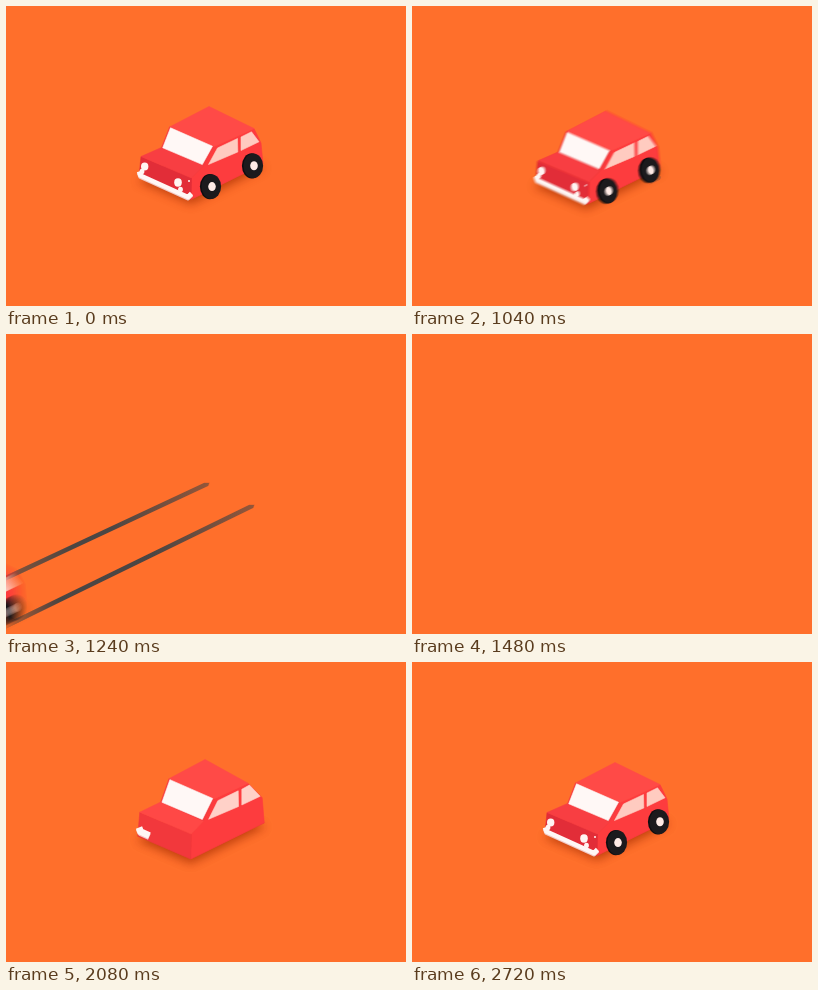
Animation, 400 px wide and 300 px high, one loop 2.76 s. Source, as an HTML page with a canvas:

```html
<!DOCTYPE html>
<html lang="en">
<head>
<meta charset="utf-8">
<title>Toy car</title>
<style>
  html, body { margin: 0; width: 100%; height: 100%; overflow: hidden; background: #ff6f2b; }
  canvas { display: block; width: 400px; height: 300px; }
</style>
</head>
<body>
<canvas id="stage" width="400" height="300"></canvas>
<script>
const LOOP = 2760, STEP = 40, SHUTTER = 9, SLOPE = 0.48;
const BUILD = 1770, DRIVE = 992, ERASE = 1226, EMPTY = 1480;

const stage = document.getElementById('stage').getContext('2d');
const layer = document.createElement('canvas');
layer.width = 400;
layer.height = 300;
const c = layer.getContext('2d');

const clamp = k => Math.min(1, Math.max(0, k));
const ramp = (t, from, to) => clamp((t - from) / (to - from));
const smooth = k => k * k * (3 - 2 * k);
const easeOut = k => 1 - (1 - k) ** 3;
const backOut = k => k <= 0 ? 0 : 1 + 2.7 * (k - 1) ** 3 + 1.7 * (k - 1) ** 2;
const mix = (a, b, k) => `rgb(${a.map((v, i) => v + (b[i] - v) * k)})`;
const travel = ms => 0.00397 * Math.max(0, ms) ** 2;

// Body points: screen x, screen y, height above ground, lean while stretched
const P = {
  baseL: [133, 171, 0], baseF: [185, 193.5, 0], baseR: [257, 158, 0], baseB: [205, 138, 0],
  noseL: [135, 150.5, 20], noseR: [185.5, 172, 20],
  cowlL: [155.5, 141.5, 26], cowlR: [197.5, 160, 26], tail: [255, 137, 24],
  roofL: [163.5, 121, 42], roofF: [208, 140.5, 42], roofR: [248, 122.5, 42, 7], roofB: [203, 100.5, 42, 4]
};
const face = names => names.split(' ').map(n => P[n]);
const BASE = face('baseL baseF baseR baseB');
const FRONT = face('baseL baseF noseR noseL');
const SIDE = face('baseF noseR cowlR roofF roofR tail baseR');
const HOOD = face('noseL noseR cowlR cowlL');
const SHIELD = face('cowlL cowlR roofF roofL');
const ROOF = face('roofL roofF roofR roofB');
const GLASS = [[164.5, 121.8, 41.5], [206.5, 140.2, 41.5], [196.3, 158.6, 26.5], [156.7, 141.8, 26.5]];
const WINDOWS = [
  [[211.5, 142, 39], [231.5, 132.5, 40], [231.8, 146, 27], [202.5, 158.5, 27]],
  [[235, 131, 40], [245.5, 125.8, 41, 3], [253, 135.8, 26], [235, 144.5, 27]]
];
const LIGHTS = [[138.7, 160.5, 3.7, 2160], [172, 176.5, 3.8, 2200], [136, 165.5, 2.4, 2260],
                [174.5, 183.5, 2.4, 2300], [183, 175, 1, 2340]];
const WHEELS = [[204.5, 180.6, 2200], [246.5, 159.8, 2260]];
// Tyre marks: start x, start y, slope, length of the soft end
const TRACKS = [[203, 149.5, 0.468, 75], [248, 171.5, 0.488, 10]];

function disc(x, y, rx, ry, color) {
  c.fillStyle = color;
  c.beginPath();
  c.ellipse(x, y, Math.max(0, rx), Math.max(0, ry), 0, 0, 7);
  c.fill();
}

function drawTracks(t) {
  const head = travel(t - DRIVE), tail = travel(t - ERASE);
  for (const [x, y, slope, soft] of TRACKS) {
    const x0 = x - tail, x1 = x - Math.min(head, x + 60);
    if (x0 <= x1) continue;
    const y0 = y + tail * slope, y1 = y + (x - x1) * slope;
    const ink = c.createLinearGradient(x0, 0, x0 - 100, 0);
    ink.addColorStop(0, 'rgba(75,70,68,.6)');
    ink.addColorStop(1, 'rgba(75,70,68,1)');
    c.fillStyle = ink;
    c.beginPath();
    c.moveTo(x0 - 4, y0 - 1);
    c.lineTo(x0 + 1, y0 - 1);
    c.lineTo(x0, y0 + 2);
    c.lineTo(x1, y1 + 2);
    c.lineTo(x1, y1 - 2.9);
    c.fill();
    // The fresh end of each mark is still soft
    const fade = c.createLinearGradient(x - head, 0, x - head + 40 + soft, 0);
    fade.addColorStop(0, 'rgba(255,111,43,.6)');
    fade.addColorStop(1, 'rgba(255,111,43,0)');
    c.fillStyle = fade;
    c.fill();
  }
}

function drawCar(t) {
  const building = t >= BUILD;
  const time = building ? t : LOOP;
  const pump = 1 - smooth(ramp(time, 2100, 2340));
  const spread = 1.12 * easeOut(ramp(time, BUILD, 1920)) - 0.1 * smooth(ramp(time, 1920, 2060)) - 0.02 * (1 - pump);
  const rise = (1 + 0.17 * pump) * smooth(ramp(time, 1790, 2040));

  const place = ([x, y, z, lean = 0]) => [
    195 + (x - lean * pump - 195) * spread,
    167 + (y + z + lean * pump * 0.4 - 167) * spread - z * rise + 3 * pump
  ];
  const poly = (points, color) => {
    c.beginPath();
    points.forEach(p => c.lineTo(...place(p)));
    c.closePath();
    c.fillStyle = c.strokeStyle = color;
    c.lineWidth = 0.6;
    c.fill();
    c.stroke();
  };

  c.save();
  const dx = building ? 0 : travel(t - DRIVE);
  c.translate(-dx, dx * SLOPE);
  c.lineJoin = 'round';

  c.save();
  c.shadowColor = 'rgba(165,45,0,.7)';
  c.shadowBlur = 10;
  c.shadowOffsetY = 4;
  poly(BASE, '#d8402c');
  c.restore();

  poly(SIDE, '#fd3c3e');
  poly(FRONT, mix([226, 45, 56], [242, 56, 60], pump));
  poly(HOOD, mix([248, 62, 66], [255, 72, 70], pump));
  poly(SHIELD, '#f63e42');
  poly(ROOF, '#ff4a47');
  poly(GLASS, '#fff8f6');
  WINDOWS.forEach(w => poly(w, mix([255, 203, 192], [255, 209, 200], pump)));

  const bumper = 0.07 + 0.93 * smooth(ramp(time, 2030, 2240));
  if (time >= 2040) {
    c.setLineDash([69 * bumper, 200]);
    for (const [color, lift] of [['#f3c9c4', 1.2], ['#fff7f5', 0]]) {
      c.strokeStyle = color;
      c.lineWidth = 4.6 + 2 * pump;
      c.beginPath();
      c.moveTo(133, 165.5 + lift);
      c.lineTo(134.5, 169.5 + lift);
      c.lineTo(182, 191 + lift);
      c.lineTo(185.5, 187.5 + lift);
      c.stroke();
    }
    c.setLineDash([]);
  }

  for (const [x, y, r, start] of LIGHTS) {
    const k = backOut(ramp(time, start, start + 200));
    disc(x, y, r * k, r * 1.1 * k, '#fff5f2');
  }
  for (const [x, y, start] of WHEELS) {
    const k = backOut(ramp(time, start, start + 260));
    const hub = backOut(ramp(time, start + 80, start + 340));
    disc(x - 0.8, y, 9.8 * k, 12.6 * k, '#0e0d10');
    disc(x + 0.8, y, 9.8 * k, 12.4 * k, '#1c1a1d');
    disc(x + 1.5, y, 3.8 * hub, 4.5 * hub, '#ffebe6');
  }
  c.restore();
}

function drawScene(t) {
  c.fillStyle = '#ff6f2b';
  c.fillRect(0, 0, 400, 300);
  if (t < EMPTY - SHUTTER) drawTracks(t);
  if (t < 1400 || t >= BUILD) drawCar(t);
}

function render(t) {
  const moving = t > DRIVE - SHUTTER && t < EMPTY;
  const samples = moving ? 16 : 1;
  for (let i = 0; i < samples; i++) {
    drawScene(moving ? t + SHUTTER * ((i + 0.5) / samples - 0.5) : t);
    stage.globalAlpha = 1 / (i + 1);
    stage.drawImage(layer, 0, 0);
  }
}

let shown = -1;
const begin = performance.now();
function tick() {
  const t = Math.floor(((performance.now() - begin) % LOOP) / STEP) * STEP;
  if (t !== shown) render(shown = t);
  requestAnimationFrame(tick);
}
tick();
</script>
</body>
</html>
```
